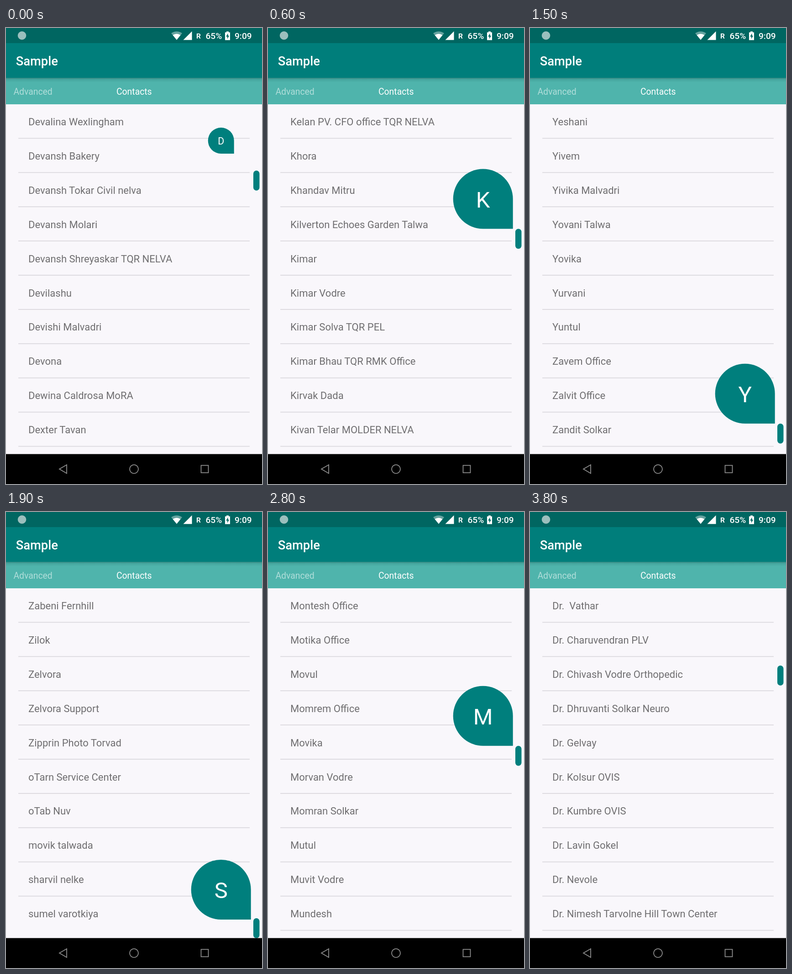
Animation, 561 px wide and 998 px high, one loop 3900 ms. Source, as an HTML page:

```html
<!DOCTYPE html>
<html lang="en">
<head>
<meta charset="utf-8">
<title>Contacts fast scroll</title>
<style>
  html, body { margin: 0; width: 100%; height: 100%; overflow: hidden; background: #f9f7fb; }
  svg { display: block; font-family: Roboto, sans-serif; }
  text { white-space: pre; }
  .row { font-size: 22px; fill: #6f6e70; }
  .tab { font-size: 19.35px; fill: #fff; }
  .status { font-size: 19.1px; font-weight: 500; fill: #fff; }
  .nav { fill: none; stroke: #8c8c8c; stroke-width: 1.8; }
</style>
</head>
<body>
<svg width="561" height="998">
  <defs>
    <linearGradient id="shade" x2="0" y2="1">
      <stop offset="0" stop-color="#003c3a" stop-opacity=".38"/>
      <stop offset=".35" stop-color="#003c3a" stop-opacity=".12"/>
      <stop offset="1" stop-color="#003c3a" stop-opacity="0"/>
    </linearGradient>
  </defs>
  <rect width="561" height="998" fill="#f9f7fb"/>
  <g id="list"></g>

  <rect width="561" height="33" fill="#006661"/>
  <rect y="33" width="561" height="76" fill="#007e7b"/>
  <rect y="109" width="561" height="58" fill="#4fb4ac"/>
  <rect y="109" width="561" height="10" fill="url(#shade)"/>

  <circle cx="35" cy="16.5" r="9.3" fill="#9bbfbd"/>
  <path d="M362 11.5Q374 3.5 386 11.5L374 26Z" fill="#fff" opacity=".4"/>
  <path d="M365.5 15.5Q374 10 382.5 15.5L374 26Z" fill="#fff"/>
  <path d="M388.5 26.3H407.5V7.3Z" fill="#fff"/>
  <path d="M480 9.5H483V7.5H488V9.5H491V26.5H480Z" fill="#fff"/>
  <path d="M486.5 11.5L482.2 18.8H485V24L489 16.8H486.5Z" fill="#006661"/>
  <text class="status" x="417" y="22.5" style="font-size:15.5px;font-weight:700">R</text>
  <text class="status" x="437.5" y="23.8">65%</text>
  <text class="status" x="501" y="23.8">9:09</text>
  <text x="21.8" y="81.5" font-size="27.3" font-weight="500" fill="#fff">Sample</text>
  <text class="tab" x="16.5" y="146" opacity=".55">Advanced</text>
  <text class="tab" x="242" y="146">Contacts</text>

  <rect id="thumb" x="542" width="13.5" height="43.8" rx="6.7" fill="#007f7d"/>
  <g id="bubble">
    <path d="M65.5 0V65.5H0A65.5 65.5 0 1 1 65.5 0Z" fill="#007f7d"/>
    <text id="letter" y="18.7" font-size="49" text-anchor="middle" fill="#fff"></text>
  </g>

  <rect y="932.5" width="561" height="66"/>
  <path class="nav" d="M117 965.3L133 956V974.7Z"/>
  <circle class="nav" cx="280.5" cy="965.3" r="9.5"/>
  <rect class="nav" x="427.5" y="957.3" width="16" height="16"/>
</svg>

<script>
const $ = id => document.getElementById(id);
const LOOP = 3900, STEP = 100;
const TOTAL = 700, ROWS = 10, PITCH = 74.9;
const TOP = 167, TRAVEL = 722;

// Blocks of names, keyed by their position in the contact list.
const pages = {
  140: "Devalina Wexlingham|Devansh Bakery|Devansh Tokar Civil nelva|Devansh Molari|Devansh Shreyaskar TQR NELVA|Devilashu|Devishi Malvadri|Devona|Dewina Caldrosa MoRA|Dexter Tavan",
  163: "Dr.  Vathar|Dr. Charuvendran PLV|Dr. Chivash Vodre Orthopedic|Dr. Dhruvanti Solkar Neuro|Dr. Gelvay|Dr. Kolsur OVIS|Dr. Kumbre OVIS|Dr. Lavin Gokel|Dr. Nevole|Dr. Nimesh Tarvolne Hill Town Center",
  196: "Gomvera|Gomble Search|Gonvi|Gorlan Vesk MOLDER TQR NELVA|Gorand|Gorand MOLDER TQR NELVA|Gorvathi PK|Gosal Music Secy|Gulmora Tavish|Gumti V2",
  264: "Kelan PV. CFO office TQR NELVA|Khora|Khandav Mitru|Kilverton Echoes Garden Talwa|Kimar|Kimar Vodre|Kimar Solva TQR PEL|Kimar Bhau TQR RMK Office|Kirvak Dada|Kivan Telar MOLDER NELVA",
  490: "Raminder Vosal|Ramvik Loubi|Ramola Tao|Rakshin Belmi Malvadri|Ralna Kakusi|Ramo Vittel|Ramesvar Gaikrel|Ramesvar Gokel - Sunvay Mundar|Rayvel Kirmal Homestyle|Rebi Ikvol TLMV VOP3",
  512: "Rovik Driver Malvadri|Rudrel Kelmukha|Rudrel Nivate|Rukhmor Garden Talwa|Rumil Stores TQR NELVA|Rumsa Orive|Runvik|Runvik OLT|Runvik Vora|Ruvanaj",
  690: "Zabeni Fernhill|Zilok|Zelvora|Zelvora Support|Zipprin Photo Torvad|oTarn Service Center|oTab Nuv|movik talwada|sharvil nelke|sumel varotkiya"
};

// First list position of each letter A-Z.
const starts = [0, 50, 95, 122, 178, 184, 190, 216, 231, 238, 256, 288, 303,
                350, 376, 384, 466, 468, 526, 604, 624, 634, 664, 670, 674, 684];
const middles = ["lv", "mr", "nd", "rv", "sh", "v", "nt", "t"];
const endings = ["ika", "esh", "an", "ora", "it", "ul", "ani", "em"];
const extras = ["", "", " Malvadri", " Vodre", " Talwa", " TQR NELVA", " Solkar", " Office"];

const rand = n => { const s = Math.sin(n * 12.9898) * 43758.5453; return s - Math.floor(s); };
const pick = (items, seed) => items[Math.floor(rand(seed) * items.length)];

function makeName(i) {
  const k = starts.findLastIndex(start => start <= i);
  const share = (i - starts[k]) / ((starts[k + 1] || TOTAL) - starts[k]);
  return String.fromCharCode(65 + k) + "aeiou"[Math.floor(share * 5)] +
    pick(middles, i + .1) + pick(endings, i + .4) + pick(extras, i + .7);
}

const names = Array.from({ length: TOTAL }, (_, i) => makeName(i));
for (const start in pages) pages[start].split("|").forEach((name, k) => names[+start + k] = name);

// Finger drag: time, height, speed in px per ms. It overshoots the end of the track.
const drag = [
  [0, 312, 0], [600, 439.5, .38], [1100, 673, .46], [1650, 892, 0],
  [1900, 892, 0], [2400, 695.5, -.43], [3200, 370, -.22], [3500, 336, 0]
];

function fingerY(t) {
  const k = drag.findIndex(key => key[0] > t);
  if (k < 0) return drag.at(-1)[1];
  const [t0, y0, v0] = drag[k - 1], [t1, y1, v1] = drag[k];
  const d = t1 - t0, u = (t - t0) / d, w = 1 - u;
  return y0 + (y1 - y0) * u * u * (3 - 2 * u) + d * u * w * (v0 * w - v1 * u);
}

function bubbleScale(t) {
  const grow = .435 + t / 250, shrink = (3800 - t) / 200;
  return Math.max(0, Math.min(1, grow, shrink));
}

function add(tag, attrs) {
  const el = document.createElementNS("http://www.w3.org/2000/svg", tag);
  for (const key in attrs) el.setAttribute(key, attrs[key]);
  return $("list").appendChild(el);
}

const rows = Array.from({ length: ROWS }, (_, k) => ({
  text: add("text", { class: "row", x: 49, y: 213 + k * PITCH }),
  line: add("rect", { x: 27, y: 240.6 + k * PITCH, width: 507, height: 1.7, fill: "#dad8dd" })
}));

function draw(t) {
  const y = fingerY(t);
  const thumbY = Math.min(y, TOP + TRAVEL);
  const index = Math.min(TOTAL - 1, Math.floor((thumbY - TOP) / TRAVEL * TOTAL));
  const first = Math.min(index, TOTAL - ROWS);
  rows.forEach(({ text, line }, k) => {
    text.textContent = names[first + k];
    line.setAttribute("opacity", first + k < TOTAL - 1 ? 1 : 0);
  });
  $("thumb").setAttribute("y", thumbY);
  $("letter").textContent = names[index][0].toUpperCase();
  $("bubble").setAttribute("transform", `translate(471.2 ${y - 65.5}) scale(${bubbleScale(t)})`);
}

const origin = performance.now();
function tick() {
  const t = (performance.now() - origin) % LOOP;
  draw(Math.floor(t / STEP) * STEP);
  requestAnimationFrame(tick);
}
tick();
</script>
</body>
</html>
```
